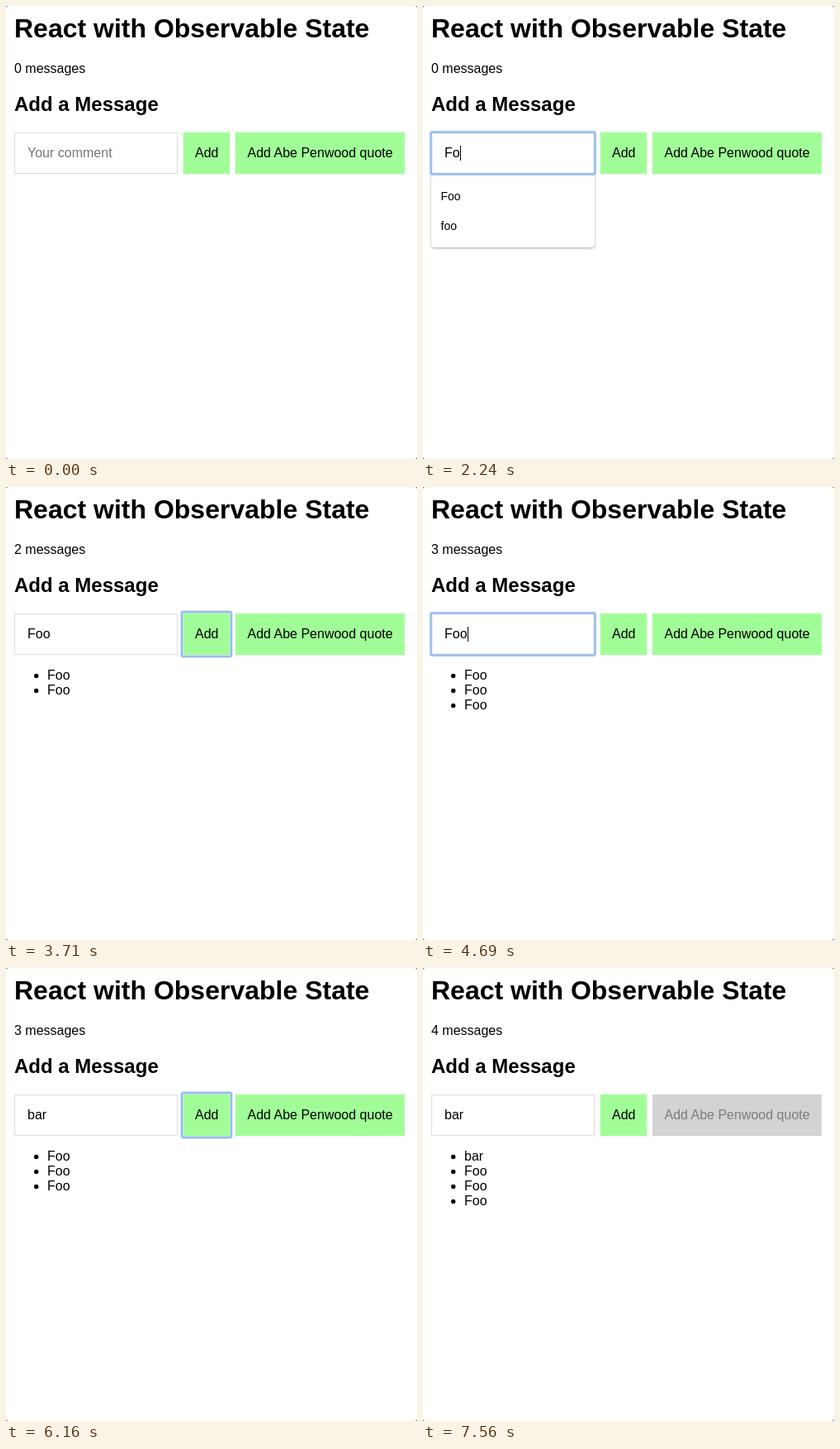
These frames come from a looping animation (498x548 px, 8000 ms). An HTML page:

```html
<!DOCTYPE html>
<html lang="en">
<head>
<meta charset="utf-8">
<title>React with Observable State</title>
<style>
  html, body { margin: 0; width: 100%; height: 100%; overflow: hidden; background: #fff; }
  svg { display: block; }
  text { font: 16px "Liberation Sans", Arial, sans-serif; white-space: pre; }
  .h1 { font-size: 32px; font-weight: bold; }
  .h2 { font-size: 24px; font-weight: bold; }
  .button { fill: #a1fd98; stroke: #b6fcb0; stroke-opacity: .7; }
  .field { fill: #fff; stroke: #ddd; }
  .placeholder { fill: #757575; }
  .ring { filter: blur(.4px); }
  .ring rect { fill: none; stroke: #86b3ea; rx: 2px; }
  .ring .glow { stroke-width: 4px; stroke-opacity: .35; }
  .ring .line { stroke-width: 2px; stroke-opacity: .8; }
  .menu path { fill: #fff; filter: drop-shadow(0 1px 1.5px rgba(0, 0, 0, .35)); }
  .menu text { font-size: 14px; }
  .disabled .button { fill: #d3d3d3; stroke: none; }
  .disabled text { fill: #7c7c7c; }
</style>
</head>
<body>
<svg width="498" height="548" viewBox="0 0 498 548">
  <text class="h1" x="10" y="38">React with Observable State</text>
  <text id="count" x="10" y="81"></text>
  <text class="h2" x="10" y="127">Add a Message</text>

  <g id="list"></g>
  <g id="menu" class="menu"></g>

  <rect class="field" x="10.5" y="153.5" width="197" height="49"/>
  <rect id="valueMark" x="26" y="169" height="18" fill="#b5d6fd"/>
  <text id="value" x="26" y="183"></text>
  <rect id="caret" y="169" width="1" height="18"/>

  <rect class="button" x="215" y="153" width="56" height="50"/>
  <text x="229" y="183">Add</text>

  <g id="quote">
    <rect class="button" x="278" y="153" width="205" height="50"/>
    <rect id="quoteMark" x="429.5" y="169" width="40" height="18" fill="#9dcad8"/>
    <text x="292.5" y="183">Add Abe Penwood quote</text>
  </g>

  <g id="ring" class="ring">
    <rect class="glow"/>
    <rect class="line"/>
  </g>
  <path fill="#666" fill-rule="evenodd"
    d="M0 0H498V548H0ZM3 0Q0 0 0 3V545Q0 548 3 548H495Q498 548 498 545V3Q498 0 495 0Z"/>
</svg>

<script>
const LOOP = 8000;
const HISTORY = ["Foo", "foo", "bar", "baz", "test", "hello"];
const FOO = HISTORY.slice(0, 2);
const BAR = ["bar"];

// Centre line of the focus ring: x, y, width, height
const RINGS = {
  input: [9.5, 152.5, 199, 51],
  add: [213, 151, 60, 54],
  quote: [276, 151, 209, 54]
};

const START = {
  value: "", items: [], menu: [], focus: null,
  caret: false, valueMark: false, quoteMark: false, disabled: false
};

// Each step changes part of the state from its time on
const STEPS = [
  [910, { quoteMark: true }],
  [1470, { quoteMark: false, focus: "input", caret: true, menu: HISTORY }],
  [1960, { caret: false }],
  [2100, { value: "F", caret: true, menu: FOO }],
  [2240, { value: "Fo" }],
  [2520, { value: "Foo" }],
  [3080, { caret: false }],
  [3220, { focus: "add", menu: [] }],
  [3290, { items: ["Foo"] }],
  [3710, { items: ["Foo", "Foo"] }],
  [4200, { items: ["Foo", "Foo", "Foo"] }],
  [4480, { focus: "input", caret: true }],
  [4760, { caret: false, valueMark: true, menu: FOO }],
  [5040, { value: "b", valueMark: false, caret: true, menu: BAR }],
  [5180, { value: "ba" }],
  [5320, { value: "bar", menu: [] }],
  [5880, { caret: false }],
  [6160, { focus: "add" }],
  [6230, { items: ["bar", "Foo", "Foo", "Foo"] }],
  [6930, { focus: "quote" }],
  [7070, { focus: null, disabled: true }]
];

const $ = id => document.getElementById(id);
const show = (id, on) => { $(id).style.display = on ? "" : "none"; };

function setAttrs(node, attrs) {
  for (const key in attrs) node.setAttribute(key, attrs[key]);
}

function drawMenu(items) {
  const bottom = 220 + 36 * items.length;
  const box = `<path d="M10 204H208V${bottom - 4}q0 4 -4 4H14q-4 0 -4 -4Z"/>`;
  const rows = items.map((s, i) => `<text x="21.5" y="${235 + 36 * i}">${s}</text>`);
  $("menu").innerHTML = items.length ? box + rows.join("") : "";
}

function drawList(items) {
  const n = items.length;
  $("count").textContent = `${n} message${n === 1 ? "" : "s"}`;
  $("list").innerHTML = items.map((s, i) =>
    `<circle cx="36.7" cy="${228.5 + 18 * i}" r="2.7"/>` +
    `<text x="50" y="${233 + 18 * i}">${s}</text>`).join("");
}

function drawField(s) {
  const text = $("value");
  text.textContent = s.value || "Your comment";
  text.setAttribute("class", s.value ? "" : "placeholder");
  const width = s.value ? text.getComputedTextLength() : 0;
  $("caret").setAttribute("x", Math.round(26 + width));
  $("valueMark").setAttribute("width", width);
  show("caret", s.caret);
  show("valueMark", s.valueMark);
}

function drawRing(focus) {
  show("ring", focus);
  if (!focus) return;
  const [x, y, width, height] = RINGS[focus];
  for (const rect of $("ring").children) setAttrs(rect, { x, y, width, height });
}

function render(s) {
  drawList(s.items);
  drawMenu(s.menu);
  drawField(s);
  drawRing(s.focus);
  show("quoteMark", s.quoteMark);
  $("quote").setAttribute("class", s.disabled ? "disabled" : "");
}

let drawn = -1;
function tick() {
  const t = performance.now() % LOOP;
  const past = STEPS.filter(([time]) => time <= t);
  if (past.length !== drawn) {
    drawn = past.length;
    render(Object.assign({}, START, ...past.map(([, change]) => change)));
  }
  requestAnimationFrame(tick);
}
tick();
</script>
</body>
</html>
```
